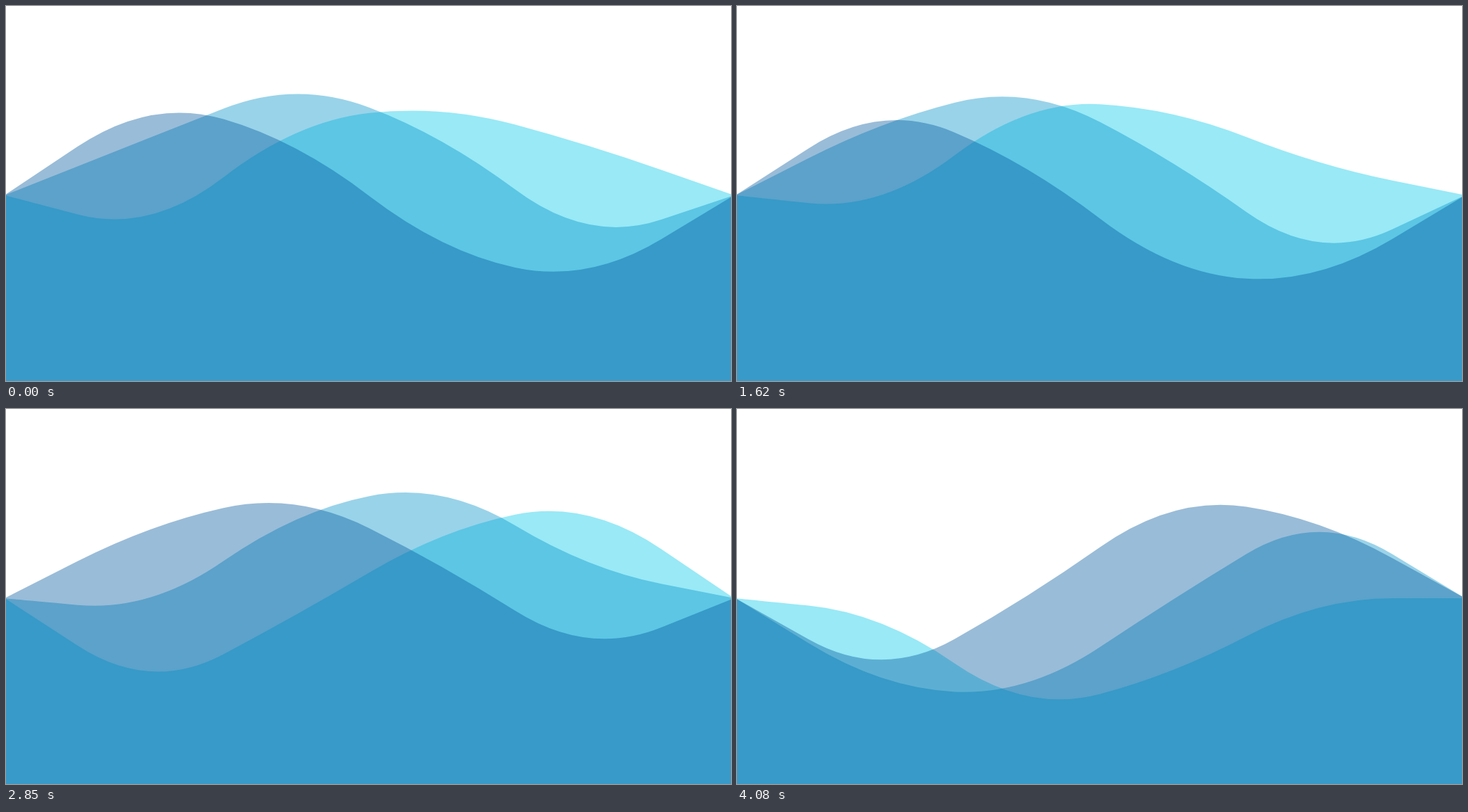
An HTML page with a canvas that plays this animation: 1040x539 px, repeating every 4150 ms.

```html
<!DOCTYPE html>
<html lang="en">
<head>
<meta charset="utf-8">
<title>Waves</title>
<style>
  html, body { margin: 0; width: 100%; height: 100%; overflow: hidden; background: #fff; }
  canvas { display: block; }
</style>
</head>
<body>
<canvas id="stage" width="1040" height="539"></canvas>
<script>
const canvas = document.getElementById('stage');
const ctx = canvas.getContext('2d');

const LOOP = 4150;
const STEP = 77;
const STEP_LEAD = 12;
const LAST_STEP = 53;
const MIDLINE = 272;
const LEFT = -2;
const SPACING = 209.3;

// Back to front; each inner node swings by its own amplitude.
const waves = [
  { color: 'rgba(0, 200, 232, .4)', swing: [150, 182, 130, 148] },
  { color: 'rgba(0, 146, 200, .4)', swing: [142, 166, 175, 151] },
  { color: 'rgba(0, 87, 158, .4)', swing: [140, 160, 175, 127] }
];

// [step, phase in radians]: the waves speed up and slow down a little.
const pace = [
  [0, 2.625], [7, 4.655], [13, 6.533], [21, 9.133],
  [31, 12.63], [44, 16.53], [53, 18.85]
];

function phaseAt(step) {
  const next = Math.max(1, pace.findIndex(([s]) => s >= step));
  const [s0, p0] = pace[next - 1];
  const [s1, p1] = pace[next];
  return p0 + (p1 - p0) * (step - s0) / (s1 - s0);
}

function drawWave({ color, swing }, layer, phase) {
  const heights = swing.map((a, i) => MIDLINE - a * Math.sin(phase + i + layer - 3));
  const nodes = [MIDLINE, ...heights, MIDLINE].map((y, i) => [LEFT + i * SPACING, y]);

  ctx.fillStyle = color;
  ctx.beginPath();
  ctx.moveTo(LEFT, canvas.height);
  ctx.lineTo(...nodes[0]);
  for (let i = 0; i < nodes.length - 1; i++) {
    const [x, y] = nodes[i];
    const [nextX, nextY] = nodes[i + 1];
    ctx.quadraticCurveTo(x, y, (x + nextX) / 2, (y + nextY) / 2);
  }
  const end = nodes[nodes.length - 1];
  ctx.lineTo(...end);
  ctx.lineTo(end[0], canvas.height);
  ctx.fill();
}

function render() {
  const time = performance.now() % LOOP;
  const step = Math.min(LAST_STEP, Math.floor((time + STEP_LEAD) / STEP));
  const phase = phaseAt(step);
  ctx.clearRect(0, 0, canvas.width, canvas.height);
  waves.forEach((wave, layer) => drawWave(wave, layer, phase));
  requestAnimationFrame(render);
}
render();
</script>
</body>
</html>
```
